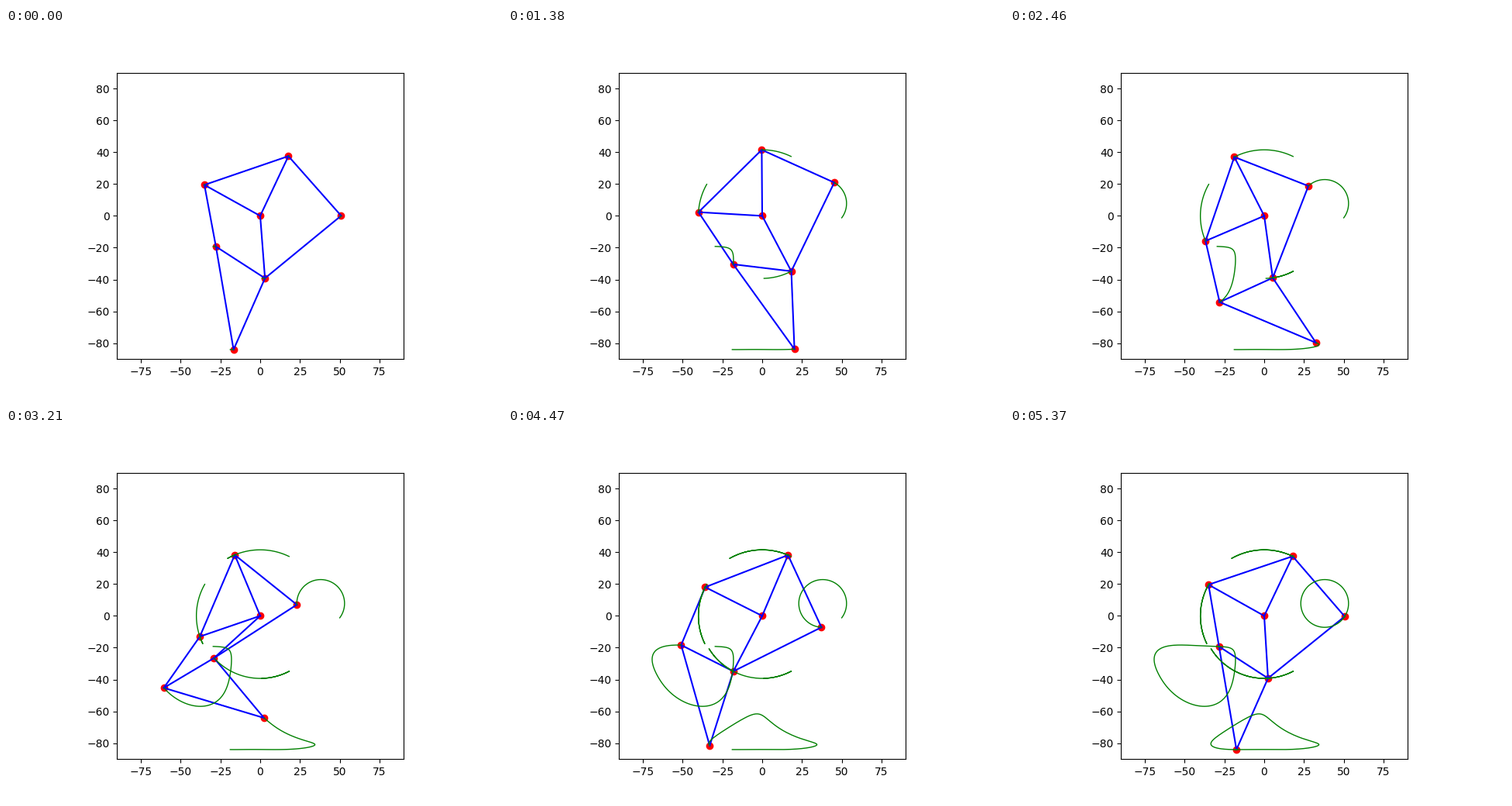
A matplotlib script that plays this animation: 640 by 480 pixels, repeating every 5400 ms.

```python
import numpy as np
import matplotlib.pyplot as plt
from matplotlib.animation import FuncAnimation

FRAMES, INTERVAL = 180, 30
STEP = 360 / FRAMES          # crank degrees per frame
START = -37                  # crank angle where the trails begin
LEAD = 3                     # steps already traced when the loop starts

# Rod lengths of the walking leg
B, C, D, E, F, G = 41.5, 39.3, 40.1, 55.8, 39.4, 36.7
H, I, J, K = 65.7, 49.0, 50.0, 61.9
CRANK_CENTER, CRANK_RADIUS = np.array([38.0, 7.8]), 15.0

NAMES = ["pivot", "crank", "top", "left", "knee", "bottom", "foot"]
LINKS = [("crank", "top"), ("crank", "bottom"), ("pivot", "top"),
         ("pivot", "left"), ("pivot", "bottom"), ("top", "left"),
         ("left", "knee"), ("knee", "bottom"), ("knee", "foot"),
         ("bottom", "foot")]


def meet(p, rp, q, rq):
    """Intersection of two circles, on the left side of p -> q."""
    delta = q - p
    dist = np.hypot(*delta)
    u = delta / dist
    along = (rp**2 - rq**2 + dist**2) / (2 * dist)
    across = np.sqrt(rp**2 - along**2)
    return p + along * u + across * np.array([-u[1], u[0]])


def solve(degrees):
    t = np.radians(degrees)
    pivot = np.zeros(2)
    crank = CRANK_CENTER + CRANK_RADIUS * np.array([np.cos(t), np.sin(t)])
    top = meet(pivot, B, crank, J)
    bottom = meet(crank, K, pivot, C)
    left = meet(pivot, D, top, E)
    knee = meet(bottom, G, left, F)
    foot = meet(bottom, I, knee, H)
    return [pivot, crank, top, left, knee, bottom, foot]


# poses[step, joint, xy]
poses = np.array([solve(START + STEP * n) for n in range(FRAMES + LEAD)])

fig, ax = plt.subplots(figsize=(6.4, 4.8), dpi=100)
ax.set_aspect("equal")
ax.set_xlim(-90, 90)
ax.set_ylim(-90, 90)

joints, = ax.plot([], [], "ro")
rods = [ax.plot([], [], "b-")[0] for _ in LINKS]
trails = [ax.plot([], [], "g-", lw=1)[0] for _ in NAMES[1:]]
ends = [(NAMES.index(a), NAMES.index(b)) for a, b in LINKS]


def update(frame):
    now = frame + LEAD
    pose = poses[now]
    joints.set_data(pose[:, 0], pose[:, 1])
    for rod, pair in zip(rods, ends):
        rod.set_data(*pose[list(pair)].T)
    for joint, trail in enumerate(trails, start=1):
        trail.set_data(*poses[:now + 1, joint].T)
    return [joints, *rods, *trails]


anim = FuncAnimation(fig, update, frames=FRAMES, interval=INTERVAL,
                     init_func=lambda: update(0), repeat=True)
plt.show()
```
